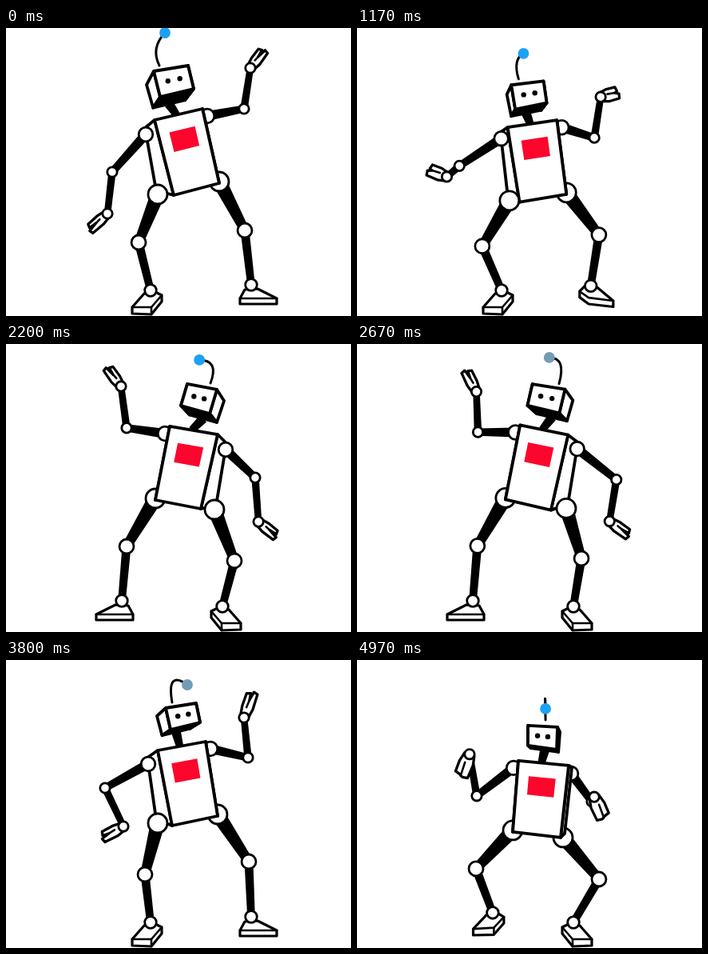
Animation of 432 by 360 pixels, one loop 5 s. Source, as an HTML page with a canvas:

```html
<!DOCTYPE html>
<html lang="en">
<head>
<meta charset="utf-8">
<title>Dancing robot</title>
<style>
html, body { margin: 0; width: 100%; height: 100%; overflow: hidden; background: #fff; }
canvas { display: block; width: 432px; height: 360px; }
</style>
</head>
<body>
<canvas id="stage" width="432" height="360"></canvas>
<script>
const ctx = document.getElementById('stage').getContext('2d');
const LOOP = 5000, HALF = 1750, AXIS = 452;
const INK = '#000', PAPER = '#fff', RED = '#fb062d';

const mixList = (a, b, k) => a.map((v, i) => v + (b[i] - v) * k);
const mixPose = (a, b, k) =>
  Object.fromEntries(Object.keys(a).map(key => [key, mixList(a[key], b[key], k)]));

// Poses lean left. body: top left, top right, bottom left; joint: shoulder, hip;
// head: top left, top right, bottom left, rear top; whip: base, bend, ball;
// low, high: elbow, wrist, fingertips; legs: knee, knee, free ankle; turn: foot, palm.
const up = {
  body: [186, 115, 246, 101, 210, 209], joint: [175, 133, 190, 208],
  head: [185, 54, 228, 47, 193, 86, 176, 71], whip: [192, 47, 181, 25, 199, 6],
  low: [133, 180, 127, 232, 105, 252], high: [298, 101, 306, 50, 323, 28],
  legs: [166, 268, 299, 253, 307, 321], turn: [1, 13]
};
const down = {
  body: [190, 113, 250, 102, 208, 207], joint: [178, 130, 190, 204],
  head: [200, 60, 238, 54, 206, 87, 189, 70], whip: [208, 53, 201, 12, 227, 31],
  low: [124, 160, 147, 208, 121, 222], high: [303, 122, 298, 72, 309, 41],
  legs: [174, 268, 304, 252, 307, 321], turn: [1, 14]
};
const rise = {
  ...up,
  body: [187, 113, 247, 103, 208, 206], joint: [177, 132, 191, 207],
  head: [188, 57, 225, 50, 197, 87, 179, 71], whip: [196, 49, 185, 20, 210, 20],
  low: [140, 167, 136, 222, 114, 240], high: [301, 105, 308, 53, 325, 30],
  legs: [166, 271, 301, 253, 307, 321]
};
const sway = {
  ...mixPose(up, down, 0.6),
  head: [188, 55, 232, 47, 198, 85, 180, 69], whip: [197, 47, 187, 24, 203, 7],
  low: [127, 168, 139, 220, 117, 239]
};
const crouch = {
  body: [192, 136, 256, 134, 195, 229], joint: [188, 145, 192, 226],
  head: [204, 94, 241, 92, 205, 122, 203, 99], whip: [216, 86, 213, 58, 221, 66],
  low: [164, 190, 158, 148, 154, 176], high: [295, 186, 304, 134, 307, 162],
  legs: [145, 279, 308, 266, 274, 324], turn: [0, 19]
};
const lift = {
  body: [187, 132, 250, 126, 197, 222], joint: [184, 142, 194, 222],
  head: [201, 84, 238, 82, 202, 112, 198, 90], whip: [216, 75, 217, 30, 216, 61],
  low: [158, 177, 155, 171, 144, 197], high: [302, 170, 311, 118, 321, 145],
  legs: [149, 274, 303, 261, 282, 316], turn: [0.15, 18]
};
const step = {
  body: [182, 122, 245, 111, 204, 215], joint: [179, 138, 192, 212],
  head: [196, 68, 233, 65, 200, 97, 191, 75], whip: [209, 56, 208, 15, 211, 40],
  low: [148, 177, 146, 194, 129, 218], high: [306, 138, 315, 86, 340, 97],
  legs: [156, 272, 302, 253, 297, 312], turn: [0.65, 15]
};
const sink = { ...mixPose(up, crouch, 0.5), high: [297, 143, 305, 92, 327, 90] };
const swing = { ...sink, low: [128, 172, 112, 180, 89, 174] };

// Side block: body top/bottom, rear top/bottom, the same for the head,
// shoulder, elbow, wrist, tip, hip, knee, ankle, foot turn.
const SIDE = 31;

function expand(p) {
  const [ax, ay, bx, by, cx, cy] = p.body, [sx, sy, hx, hy] = p.joint;
  const [ex, ey, fx, fy, gx, gy, rx, ry] = p.head;
  const dx = bx + cx - ax - 3, dy = by + cy - ay - 1;
  const kx = fx + gx - ex - 1, ky = fy + gy - ey - 3;
  const qx = rx + 0.9 * (gx - ex) + 1, qy = ry + 0.9 * (gy - ey);
  const [k1x, k1y, k2x, k2y, fax, fay] = p.legs;
  return [
    ax, ay, cx, cy, sx - 1, sy - 8, hx - 2, hy - 5,
    ex, ey, gx, gy, rx, ry, qx, qy,
    sx, sy, ...p.low, hx, hy, k1x, k1y, 181, 328, 0,
    bx, by, dx, dy, bx, by, dx, dy,
    fx, fy, kx, ky, fx, fy, qx + 0.95 * (kx - gx), qy + 0.95 * (ky - gy),
    bx + 6, by + 9, ...p.high, dx, dy - 2, k2x, k2y, fax, fay, p.turn[0],
    ...p.whip, p.turn[1]
  ];
}

// Mirrors x; each part ends in one plain scalar.
function flip(v) {
  const flipX = part => part.map((n, i) => i % 2 || i === part.length - 1 ? n : AXIS - n);
  return [...flipX(v.slice(SIDE, 2 * SIDE)), ...flipX(v.slice(0, SIDE)), ...flipX(v.slice(2 * SIDE))];
}

const lean = exit => [
  [0, up], [300, down], [450, rise], [520, up], [670, sway], [780, down],
  [1040, up], [1190, exit], [1350, crouch]
].map(([t, p]) => [t, expand(p)]);
const enter = [[-280, lift], [-150, step]].map(([t, p]) => [t, expand(p)]);
const shift = (keys, by, mirror) => keys.map(([t, v]) => [t + by, mirror ? flip(v) : v]);
const cycle = [
  ...lean(swing), ...shift(enter, HALF, true),
  ...shift(lean(sink), HALF, true), ...shift(enter, 2 * HALF, false)
];
const keys = [
  ...shift(cycle.slice(-2), -2 * HALF, false), ...cycle, ...shift(cycle.slice(0, 2), 2 * HALF, false)
];

// Smooth cubic between keys that never overshoots.
function poseAt(time) {
  const t = time % (2 * HALF);
  let i = 1;
  while (keys[i + 1][0] <= t) i++;
  const [k0, k1, k2, k3] = keys.slice(i - 1, i + 3);
  const h = k2[0] - k1[0], u = (t - k1[0]) / h;
  const tangent = (a, b) => a * b <= 0 ? 0 : 2 * a * b / (a + b);
  return k1[1].map((b, n) => {
    const c = k2[1][n], mid = (c - b) / h;
    const m1 = tangent((b - k0[1][n]) / (k1[0] - k0[0]), mid) * h;
    const m2 = tangent(mid, (k3[1][n] - c) / (k3[0] - k2[0])) * h;
    const u2 = u * u, u3 = u2 * u;
    return b * (2 * u3 - 3 * u2 + 1) + m1 * (u3 - 2 * u2 + u) + c * (3 * u2 - 2 * u3) + m2 * (u3 - u2);
  });
}

function trace(pts, closed) {
  ctx.beginPath();
  pts.forEach(([x, y]) => ctx.lineTo(x, y));
  if (closed) ctx.closePath();
}
function shape(pts, fill, width) {
  trace(pts, true);
  ctx.fillStyle = fill;
  ctx.fill();
  if (width) { ctx.lineWidth = width; ctx.stroke(); }
}
function line(pts, width) {
  trace(pts);
  ctx.lineWidth = width;
  ctx.stroke();
}
function disc([x, y], r, fill, width) {
  ctx.beginPath();
  ctx.arc(x, y, r, 0, 7);
  ctx.fillStyle = fill;
  ctx.fill();
  if (width) { ctx.lineWidth = width; ctx.stroke(); }
}
const joint = (p, r) => disc(p, r, PAPER, 2.8);

function bone(a, b, ra, rb) {
  const n = Math.hypot(b[0] - a[0], b[1] - a[1]) || 1;
  const x = (a[1] - b[1]) / n, y = (b[0] - a[0]) / n;
  shape([[a[0] + x * ra, a[1] + y * ra], [b[0] + x * rb, b[1] + y * rb],
    [b[0] - x * rb, b[1] - y * rb], [a[0] - x * ra, a[1] - y * ra]], INK);
}

function hand(wrist, tip, w, sign) {
  const dx = tip[0] - wrist[0], dy = tip[1] - wrist[1], n = Math.hypot(dx, dy) || 1;
  const notch = Math.min(1, 0.62 + Math.max(0, w - 13) * 0.08);
  const at = ([u, v]) => [wrist[0] + dx * u - dy / n * v * w * sign, wrist[1] + dy * u + dx / n * v * w * sign];
  shape([[0, -0.35], [0.4, -0.5], [1, -0.45], [1.04, -0.08], [notch, 0.06],
    [0.96, 0.15], [0.9, 0.5], [0.4, 0.5], [0, 0.35]].map(at), PAPER, 3.3);
  line([[0.4, 0.1], [notch, 0.06]].map(at), 2.6);
}

const FOOT_HOME = [[-8, 4], [-23, 21], [-23, 29], [1, 30], [14, 14], [14, 6], [6, 2], [1, 21]];
const FOOT_OUT = [[-8, 5], [-32, 17], [-32, 24], [4, 24], [14, 24], [14, 17], [8, 6], [4, 17]];
function foot([x, y], turn, sign) {
  const tilt = Math.sin(Math.PI * turn) * 0.13;
  const p = FOOT_HOME.map((a, i) => mixList(a, FOOT_OUT[i], turn))
    .map(([u, v]) => [x + u * sign, y + v - tilt * (u + 28)]);
  shape(p.slice(0, 7), PAPER, 3.2);
  line([p[1], p[7], p[5]], 2.6);
  if (turn < 0.5) line([p[7], p[3]], 2.6);
}

function limbs(s, w, sign) {
  bone(s.hip, s.knee, 9, 5.8);
  bone(s.knee, s.ankle, 5.5, 4.8);
  foot(s.ankle, s.turn, sign);
  joint(s.hip, 12);
  joint(s.knee, 9);
  joint(s.ankle, 7.3);
  bone(s.shoulder, s.elbow, 6, 4.7);
  bone(s.elbow, s.wrist, 4.7, 4.2);
  joint(s.shoulder, 8.8);
  joint(s.elbow, 6.2);
  hand(s.wrist, s.tip, w, sign);
  joint(s.wrist, 6.2);
}

function box(l, r, under) {
  for (const b of [l, r]) shape([b[0], b[2], b[3], b[1]], PAPER, 3.8);
  if (under) shape([l[1], r[1], r[3], l[3]], INK, 3.4);
  shape([l[0], r[0], r[1], l[1]], PAPER, 3.8);
}
const onFace = (l, r, u, v) => mixList(mixList(l[0], l[1], v), mixList(r[0], r[1], v), u);

function readSide(v) {
  const p = Array.from({ length: 15 }, (_, i) => [v[2 * i], v[2 * i + 1]]);
  const [shoulder, elbow, wrist, tip, hip, knee, ankle] = p.slice(8);
  return { body: p.slice(0, 4), head: p.slice(4, 8), shoulder, elbow, wrist, tip, hip, knee, ankle, turn: v[30] };
}

function ballColor(t) {
  const gap = 1090, d = Math.abs((t - 1600 + 2.5 * gap) % gap - gap / 2);
  const c = mixList([29, 161, 242], [153, 153, 153], Math.max(0, 1 - d / 65));
  return `rgb(${c.map(Math.round)})`;
}

function draw(t) {
  const v = poseAt(t);
  const l = readSide(v.slice(0, SIDE)), r = readSide(v.slice(SIDE, 2 * SIDE));
  const [x0, y0, x1, y1, x2, y2, palm] = v.slice(2 * SIDE);
  ctx.fillStyle = PAPER;
  ctx.fillRect(0, 0, 432, 360);
  ctx.strokeStyle = INK;
  ctx.lineJoin = ctx.lineCap = 'round';

  const sides = [[l, 1], [r, -1]];
  const near = s => Math.abs(s.body[1][0] - s.body[3][0]) > 8;
  for (const [s, sign] of sides) if (!near(s)) limbs(s, palm, sign);
  bone(mixList(l.head[3], r.head[3], 0.5), mixList(l.body[0], r.body[0], 0.46), 6, 4.6);
  box(l.body, r.body);
  shape([[0.23, 0.2], [0.77, 0.2], [0.77, 0.46], [0.23, 0.46]].map(([a, b]) => onFace(l.body, r.body, a, b)), RED);
  for (const [s, sign] of sides) if (near(s)) limbs(s, palm, sign);

  box(l.head, r.head, true);
  for (const u of [0.33, 0.68]) disc(onFace(l.head, r.head, u, 0.47), 3.2, INK);
  ctx.beginPath();
  ctx.moveTo(x0, y0);
  ctx.quadraticCurveTo(x1, y1, x2, y2);
  ctx.lineWidth = 3;
  ctx.stroke();
  disc([x2, y2], 6.9, ballColor(t));
}

function tick() {
  draw(performance.now() % LOOP);
  requestAnimationFrame(tick);
}
tick();
</script>
</body>
</html>
```
